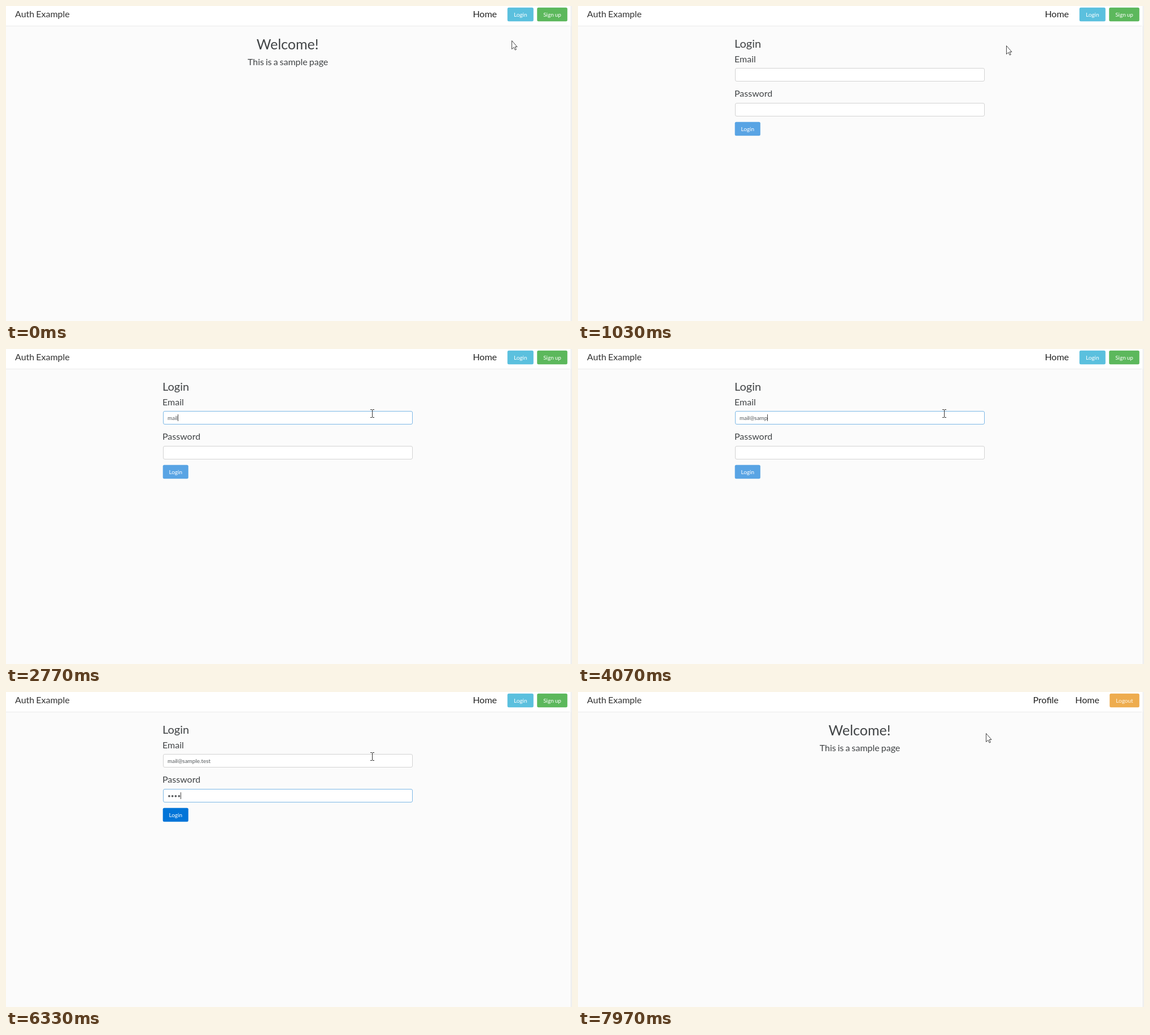
An HTML page with a canvas that plays this animation: 1002 by 559 pixels, repeating every 8000 ms.

```html
<!DOCTYPE html>
<html lang="en">
<head>
<meta charset="utf-8">
<title>Auth Example</title>
<style>
  html, body { margin: 0; width: 100%; height: 100%; overflow: hidden; background: #fbfbfb; }
  canvas { display: block; width: 1002px; height: 559px; }
</style>
</head>
<body>
<canvas id="stage" width="1002" height="559"></canvas>
<script>
const ctx = document.getElementById('stage').getContext('2d');
const LOOP = 8000;
const LATO = 'Lato, sans-serif';
const INK = '#414446';

const EMAIL = 'mail@sample.test';
const EMAIL_KEYS = [2330, 2470, 2630, 2770, 3170, 3570, 3800, 3930,
                    4070, 4200, 4330, 4500, 4700, 4730, 4800, 4830];
const PASS_KEYS = [5370, 5530, 5700, 6200, 6770, 6830, 6830];

const FORM_AT = 470, EMAIL_AT = 1440, PASS_AT = 5000, HOME_AT = 6970;

// Pointer moves: start, end, from, to, easing
const smooth = p => p * p * (3 - 2 * p);
const easeOut = p => 1 - (1 - p) * (1 - p);
const linear = p => p;
const MOVES = [
  [0, 290, [895, 61], [907, 11], easeOut],
  [700, 1300, [907, 11], [649, 114], smooth],
  [7800, 7970, [649, 114], [722, 73], linear]
];

function pointerAt(t) {
  let pos = MOVES[0][2];
  for (const [start, end, a, b, ease] of MOVES) {
    if (t < start) break;
    const p = ease(Math.min(1, (t - start) / (end - start)));
    pos = [a[0] + (b[0] - a[0]) * p, a[1] + (b[1] - a[1]) * p];
  }
  return pos.map(Math.round);
}

function text(str, x, y, size, color = INK, align = 'left', family = LATO) {
  ctx.font = `${size}px ${family}`;
  // Lato is set with narrow word spaces
  ctx.wordSpacing = family === LATO ? `${-size / 15}px` : '0px';
  ctx.textAlign = align;
  ctx.fillStyle = color;
  ctx.fillText(str, x, y);
}

function box(x, y, w, h, r, fill, stroke) {
  ctx.beginPath();
  ctx.roundRect(x, y, w, h, r);
  ctx.fillStyle = fill;
  ctx.fill();
  if (stroke) {
    ctx.strokeStyle = stroke;
    ctx.lineWidth = 1;
    ctx.stroke();
  }
}

function button(label, x, y, w, fill, color = '#fff') {
  box(x - 0.3, y - 0.2, w + 0.6, 24.4, 2.5, fill);
  text(label, x + w / 2, y + 15.7, 10, color, 'center');
}

function field(y, value, focused, caretOn) {
  box(278.5, y + 0.5, 441, 23, 2.5, '#fff', focused ? '#7db8e6' : '#d3d3d3');
  text(value, 286, y + 16, 10, '#55595c');
  if (focused && caretOn) {
    ctx.fillStyle = '#444';
    ctx.fillRect(Math.round(286 + ctx.measureText(value).width), y + 6, 1, 12);
  }
}

const typed = (keys, t) => keys.filter(k => k <= t).length;

// The caret restarts its blink at every key press
function caretOn(t, focusAt, keys) {
  const n = typed(keys, t);
  const last = n ? keys[n - 1] : focusAt;
  return (t - last) % 1000 < 530;
}

function drawNav(t, hover) {
  ctx.fillStyle = '#fff';
  ctx.fillRect(0, 0, 1002, 35);
  ctx.fillStyle = '#ebebeb';
  ctx.fillRect(0, 35, 998, 1);
  text('Auth Example', 16, 20, 16, '#333');
  if (t >= HOME_AT) {
    text('Profile', 828.2, 20, 16, '#222', 'center');
    text('Home', 901.5, 20, 16, '#222', 'center');
    button('Logout', 941.5, 3, 52, '#eeac4e', '#fff8ea');
  } else {
    text('Home', 847.7, 20, 16, '#222', 'center');
    button('Login', 888, 3, 45.5, hover ? '#31b0d5' : '#5bc0de');
    button('Sign up', 940.5, 3, 53, '#5cb85c');
  }
}

function drawWelcome() {
  text('Welcome!', 498.5, 77, 25, INK, 'center');
  text('This is a sample page', 499, 105, 16, INK, 'center');
}

function drawForm(t) {
  const inPass = t >= PASS_AT;
  text('Login', 277, 74, 20);
  text('Email', 277, 99.5, 16);
  text('Password', 277, 160.5, 16);
  field(110, EMAIL.slice(0, typed(EMAIL_KEYS, t)), t >= EMAIL_AT && !inPass,
        caretOn(t, EMAIL_AT, EMAIL_KEYS));
  field(172, '•'.repeat(typed(PASS_KEYS, t)), inPass, caretOn(t, PASS_AT, PASS_KEYS));
  button('Login', 278, 206, 44.5, inPass ? '#0275d8' : '#59a4e4');
}

function drawStatus(t) {
  if (t < HOME_AT || t > 7470) return;
  ctx.globalAlpha = Math.min(1, (7470 - t) / 300);
  box(-3.5, 545.5, 333.5, 30, 4, '#f2f3f3', '#d9d9d9');
  text('Czekam na localhost...', 0, 559, 10, '#666', 'left', '"Open Sans", sans-serif');
  ctx.globalAlpha = 1;
}

function outline(path) {
  ctx.translate(0.5, 0.5);
  ctx.fillStyle = '#fff';
  ctx.strokeStyle = '#444';
  ctx.lineWidth = 1;
  ctx.lineJoin = 'round';
  ctx.fill(path);
  ctx.stroke(path);
}

const ARROW = new Path2D('M0 0V15L3.5 11.8L5.8 16.6L7.8 15.7L5.6 11H9.5Z');
const HAND = new Path2D('M-1.5 1.2Q0 -0.6 1.4 1.2V6.6Q2.8 5.4 3.9 7Q5.2 6.2 6 7.6' +
  'Q7.6 7 7.8 9V13Q7.4 16 6.2 18.6H-0.8Q-2 15.6 -4.4 12.6Q-5.4 10.4 -3.4 10.4L-1.5 12Z');

function drawPointer(kind, x, y) {
  ctx.save();
  ctx.translate(x, y);
  if (kind === 'beam') {
    ctx.fillStyle = '#333';
    ctx.fillRect(-1, -6, 1, 13);
    for (const top of [-7, 7]) {
      ctx.fillRect(-4, top, 3, 1);
      ctx.fillRect(0, top, 3, 1);
    }
  } else {
    outline(kind === 'hand' ? HAND : ARROW);
    if (kind === 'hand') {
      ctx.beginPath();
      for (const cx of [1.4, 3.9, 6]) {
        ctx.moveTo(cx, 7.2);
        ctx.lineTo(cx, 10);
      }
      ctx.stroke();
    }
  }
  ctx.restore();
}

function draw(t) {
  const [x, y] = pointerAt(t);
  const hover = t < HOME_AT && x >= 888 && x <= 933 && y <= 27;
  const overField = t >= FORM_AT && t < 7820 && x < 720 && y >= 110;

  ctx.fillStyle = '#fbfbfb';
  ctx.fillRect(0, 0, 1002, 559);
  drawNav(t, hover);
  if (t >= FORM_AT && t < HOME_AT) drawForm(t);
  else drawWelcome();
  drawStatus(t);
  ctx.fillStyle = '#dfdfdf';
  ctx.fillRect(1000, 0, 1, 559);
  drawPointer(hover ? 'hand' : overField ? 'beam' : 'arrow', x, y);
}

function tick() {
  draw(performance.now() % LOOP);
  requestAnimationFrame(tick);
}
tick();
</script>
</body>
</html>
```
